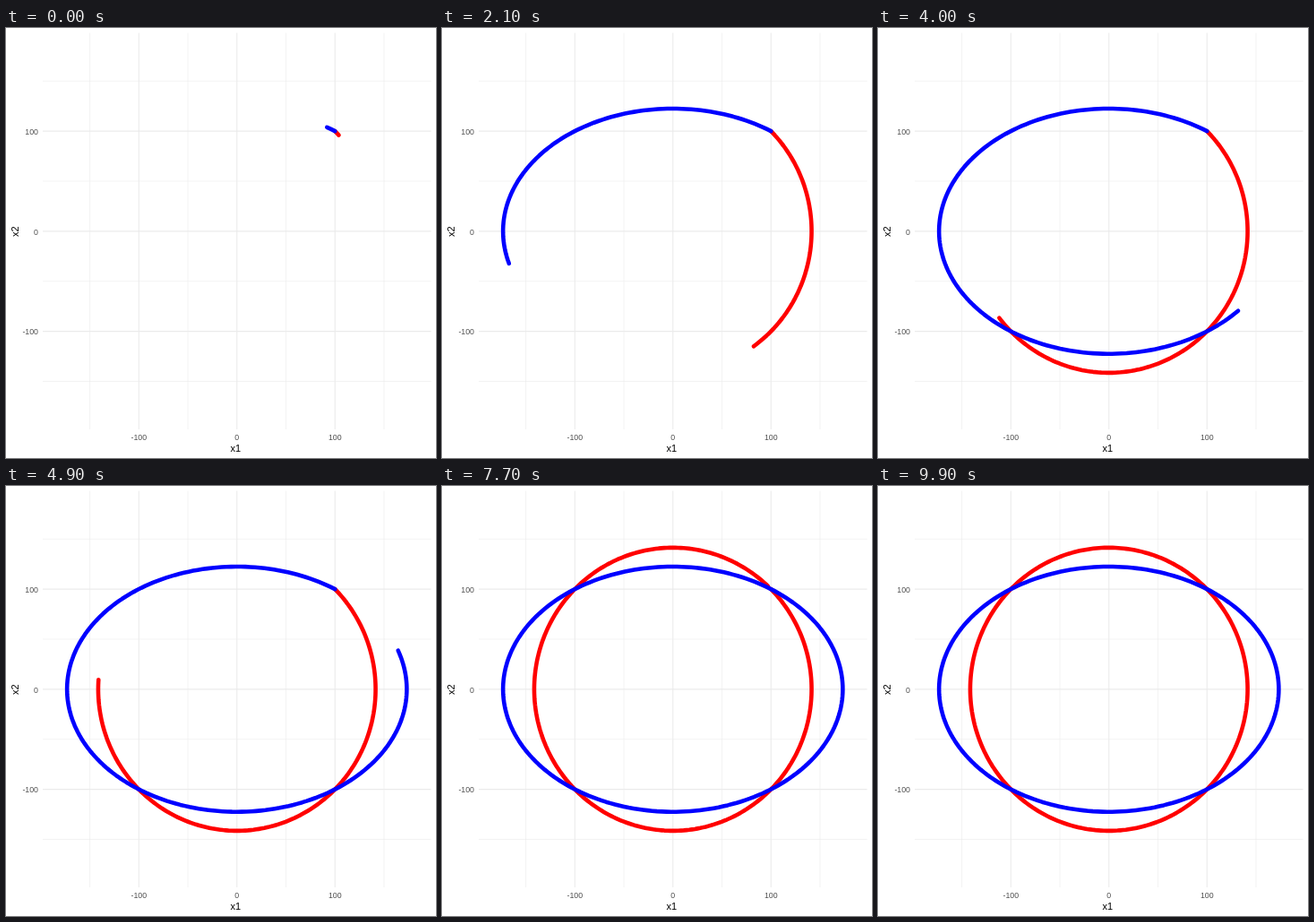
These frames come from a looping animation (480 by 480 pixels, 10 s). An HTML page:

```html
<!DOCTYPE html>
<html lang="en">
<head>
<meta charset="utf-8">
<title>Phase portrait</title>
<style>
  html, body { margin: 0; width: 100%; height: 100%; overflow: hidden; background: #fff; }
  svg { display: block; width: 480px; height: 480px; font-family: "Liberation Sans", Arial, sans-serif; }
  .grid path { stroke: #ebebeb; fill: none; }
  .tick { font-size: 8.8px; fill: #4d4d4d; }
  .title { font-size: 11px; fill: #000; text-anchor: middle; }
  .curve { fill: none; stroke-width: 4.6; stroke-linecap: round; stroke-linejoin: round; }
</style>
</head>
<body>
<svg viewBox="0 0 480 480">
  <g class="grid">
    <path id="minor" stroke-width="0.6"/>
    <path id="major" stroke-width="1.1"/>
  </g>
  <g id="ticks"></g>
  <text class="title" x="256.2" y="473">x1</text>
  <text class="title" transform="translate(13.5 227.3) rotate(-90)">x2</text>
  <polyline class="curve" id="red" stroke="#f00"/>
  <polyline class="curve" id="blue" stroke="#00f"/>
</svg>
<script>
  const $ = id => document.getElementById(id);
  const px = x => 257.75 + x * 1.0947;
  const py = y => 226.85 - y * 1.1174;

  const gridLines = values => values.map(v =>
    `M${px(v)} 5.5V448M41 ${py(v)}H474.5`).join("");
  $("minor").setAttribute("d", gridLines([-150, -50, 50, 150]));
  $("major").setAttribute("d", gridLines([-100, 0, 100]));
  $("ticks").innerHTML = [-100, 0, 100].map(v =>
    `<text class="tick" x="${px(v)}" y="460" text-anchor="middle">${v}</text>` +
    `<text class="tick" x="36" y="${py(v) + 3.9}" text-anchor="end">${v}</text>`).join("");

  // Solutions that start at (100, 100): x' = y, y' = -x and x' = -2y, y' = x
  const circle = t => [
    100 * (Math.cos(t) + Math.sin(t)),
    100 * (Math.cos(t) - Math.sin(t))
  ];
  const ellipse = t => {
    const c = Math.cos(Math.SQRT2 * t), s = Math.sin(Math.SQRT2 * t);
    return [100 * (c - Math.SQRT2 * s), 100 * (c + s / Math.SQRT2)];
  };

  function trace(id, curve, end) {
    const steps = Math.ceil(end / 0.02);
    const points = Array.from({ length: steps + 1 }, (_, i) => {
      const [x, y] = curve(end * i / steps);
      return `${px(x).toFixed(2)},${py(y).toFixed(2)}`;
    });
    $(id).setAttribute("points", points.join(" "));
  }

  const start = performance.now();
  let shown = -1;

  function draw() {
    const step = Math.floor((performance.now() - start) % 10000 / 100);
    if (step !== shown) {
      shown = step;
      const t = 0.04 + 0.0807 * step;
      trace("red", circle, Math.min(t, 2 * Math.PI));
      trace("blue", ellipse, Math.min(t, Math.SQRT2 * Math.PI));
    }
    requestAnimationFrame(draw);
  }
  draw();
</script>
</body>
</html>
```
